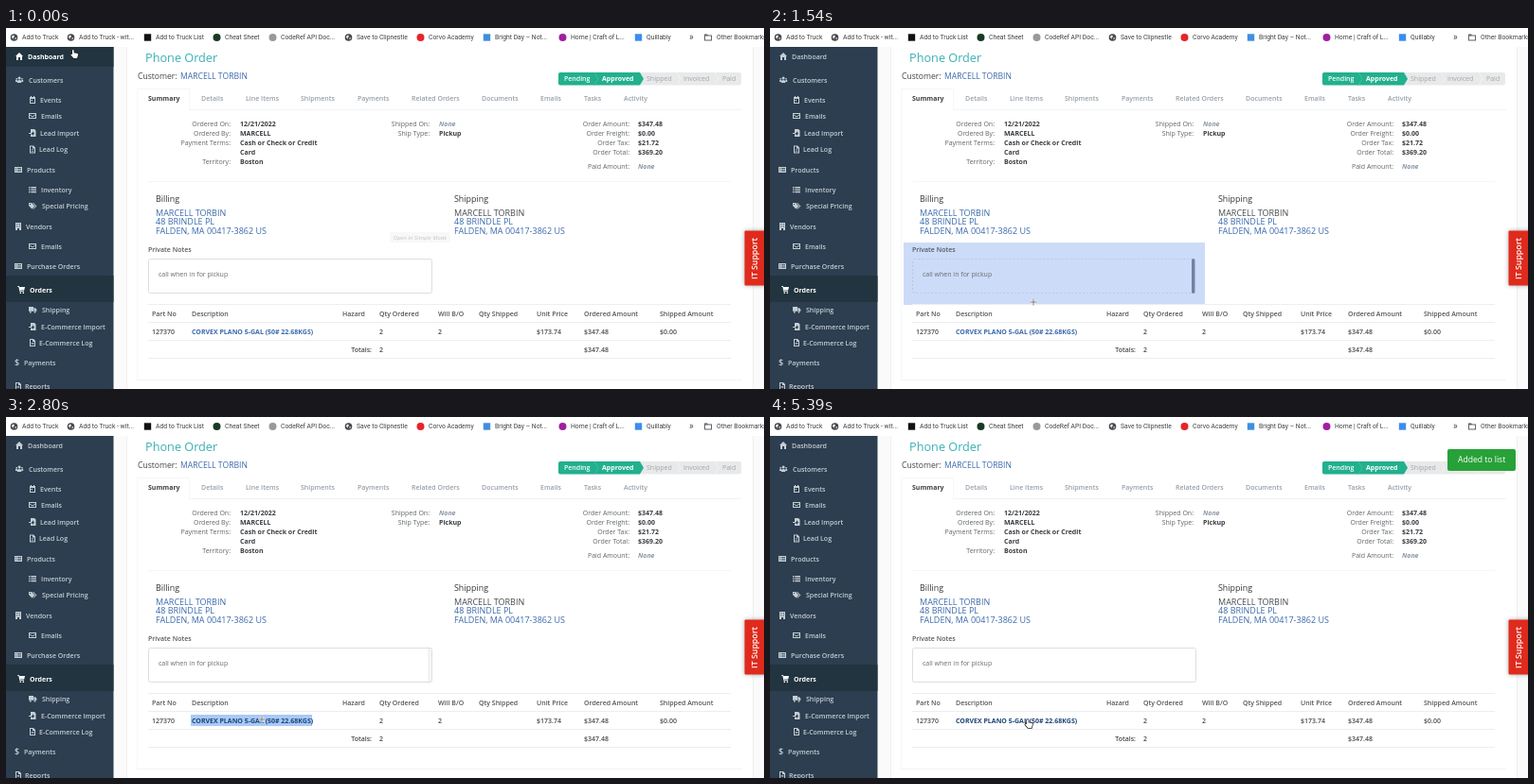
An HTML page with a canvas for the animation above (5460 ms loop, 800x382 px).

```html
<!DOCTYPE html>
<html lang="en">
<head>
<meta charset="utf-8">
<title>Phone Order</title>
<style>
html, body { margin: 0; width: 100%; height: 100%; overflow: hidden; background: #fff; }
canvas { display: block; }
</style>
</head>
<body>
<canvas id="stage" width="800" height="382"></canvas>
<script>
const c = document.getElementById('stage').getContext('2d');
const LOOP = 5460, STEP = 70;
const LINK = '#3a69ac', DARK = '#45484c', GREY = '#979fa7', RULE = '#eceeef';

// Text is placed by the vertical middle of its capitals.
function text(s, x, y, { size = 7, weight = 400, color = DARK, align = 'left', family = '"Open Sans"', style = '' } = {}) {
  c.font = `${style} ${weight} ${size}px ${family}, sans-serif`;
  c.fillStyle = color;
  c.textAlign = align;
  c.fillText(s, x, y + size * 0.36);
}
function rect(x, y, w, h, color, r = 0) {
  c.fillStyle = color;
  c.beginPath();
  c.roundRect(x, y, w, h, r);
  c.fill();
}
function frame(x, y, w, h, color, r = 0, dash = []) {
  c.strokeStyle = color;
  c.lineWidth = 1;
  c.setLineDash(dash);
  c.beginPath();
  c.roundRect(x + .5, y + .5, w - 1, h - 1, r);
  c.stroke();
  c.setLineDash([]);
}
function line(x1, y, x2, color = RULE) { rect(x1, y, x2 - x1, 1, color); }
function dot(x, y, r, color) {
  c.fillStyle = color;
  c.beginPath();
  c.arc(x, y, r, 0, 7);
  c.fill();
}
function shape(d, x, y, fill, stroke, width = 1) {
  const p = new Path2D(d);
  c.save();
  c.translate(x, y);
  if (stroke) { c.strokeStyle = stroke; c.lineWidth = width; c.stroke(p); }
  if (fill) { c.fillStyle = fill; c.fill(p, 'evenodd'); }
  c.restore();
}
const between = (t, a, b) => t >= a && t < b;

// Menu icons in an 8 by 8 box.
const icons = {
  home: 'M4 0L8 4H7V8H5V5H3V8H1V4H0Z',
  users: 'M2.6 2a1.5 1.5 0 1 0 3 0a1.5 1.5 0 1 0-3 0M1.8 7V5.5Q1.8 4 4 4Q6.3 4 6.3 5.5V7ZM0 6V4.5Q0 3.5 1.8 3.5V6ZM8.2 6V4.5Q8.2 3.5 6.4 3.5V6ZM.5 2h1.4v1.2H.5ZM6.3 2h1.4v1.2H6.3Z',
  calendar: 'M1 1H2V0H3V1H5V0H6V1H7V8H1ZM2 3V7H6V3ZM2.5 4H4V5.3H2.5Z',
  mail: 'M0 1H8V7H0ZM1 2V2.4L4 4.6L7 2.4V2ZM1 3.4V6H7V3.4L4 5.6Z',
  import: 'M2 0H6L7.5 1.5V8H2V5.5H4V7L6 4.5L4 2.3V4H2ZM0 4H3V5H0Z',
  file: 'M1 0H5L7 2V8H1ZM2 1V7H6V3H4V1ZM2.6 4H5.4V4.7H2.6ZM2.6 5.4H5.4V6.1H2.6Z',
  card: 'M0 1H8V7H0ZM1 2.3H2V3.2H1ZM3 2.3H7V3.2H3ZM1 4.6H2V5.5H1ZM3 4.6H7V5.5H3Z',
  list: 'M0 1H1.5V2.4H0ZM2.3 1H8V2.4H2.3ZM0 3.4H1.5V4.8H0ZM2.3 3.4H8V4.8H2.3ZM0 5.8H1.5V7.2H0ZM2.3 5.8H8V7.2H2.3Z',
  tags: 'M0 1H3L6.4 4.5L3.5 7.5L0 4ZM1 2V3H2V2ZM4 1H5L8.4 4.5L5 7.8L4.6 7.3L7.2 4.5Z',
  building: 'M1 0H7V8H5V6H3V8H1ZM2.2 1.2V2.2H3.3V1.2ZM4.7 1.2V2.2H5.8V1.2ZM2.2 3.4V4.4H3.3V3.4ZM4.7 3.4V4.4H5.8V3.4Z',
  cart: 'M0 0H1.8L2.2 1H8L7.2 4.5H3L3.2 5.3H7V6H2.5L1.3 .8H0ZM2.6 6.5H4V8H2.6ZM5.6 6.5H7V8H5.6Z',
  truck: 'M0 1H5V5.7H0ZM5.4 2.3H7L8.4 4V5.7H5.4ZM1 6H2.6V7.4H1ZM5.7 6H7.3V7.4H5.7Z'
};
const menu = [
  ['Dashboard', 'home', 10, 23, 30], ['Customers', 'users', 10, 24, 55],
  ['Events', 'calendar', 24, 36, 76], ['Emails', 'mail', 24, 37, 93],
  ['Lead Import', 'import', 24, 36, 111], ['Lead Log', 'file', 24, 35, 128.5],
  ['Products', 'card', 9, 22, 150], ['Inventory', 'list', 24, 37, 171],
  ['Special Pricing', 'tags', 24, 38, 188], ['Vendors', 'building', 9, 21, 210],
  ['Emails', 'mail', 24, 37, 231], ['Purchase Orders', 'card', 9, 22, 252],
  ['Orders', 'cart', 12, 25, 277], ['Shipping', 'truck', 24, 38, 298],
  ['E-Commerce Import', 'import', 24, 37, 316], ['E-Commerce Log', 'file', 24, 35, 333],
  ['Payments', '', 9, 19, 354], ['Reports', 'file', 9, 20, 379]
];

function bookmarks(t) {
  rect(0, 0, 800, 20, '#fff');
  if (between(t, 350, 1225)) rect(-4, 1, 63, 17, '#e1e2e4', 8);
  const items = [
    ['Add to Truck', 17, 'globe'], ['Add to Truck - wit...', 77, 'globe'],
    ['Add to Truck List', 158, '#111', 1], ['Cheat Sheet', 231, '#173b22'],
    ['CodeRef API Doc...', 290, '#999'], ['Save to Clipnestle', 370, 'globe'],
    ['Corvo Academy', 446, '#e5252a'], ['Bright Day – Not...', 516, '#3f8fe0', 1],
    ['Home | Craft of L...', 596, '#a020a0'], ['Quillably', 676, '#3c8cf0', 1],
    ['Other Bookmarks', 750, 'folder']
  ];
  for (const [label, x, mark, square] of items) {
    const mx = x - 8.5;
    if (mark === 'globe') {
      dot(mx, 10, 3.8, '#44484c');
      shape('M-2.6-1L-.5-2.4L.5-1L-.8.3L-1.2 2ZM1 .2L2.7.5L1.3 2.4Z', mx, 10, '#fff');
    } else if (mark === 'folder') {
      shape('M0 0H3L4 1H8V7H0ZM1 2V6H7V2Z', x - 13, 6.5, '#5f6368');
    } else if (square) rect(mx - 3.7, 6.3, 7.4, 7.4, mark);
    else dot(mx, 10, 4, mark);
    text(label, x, 10, { size: 6.8, family: 'Roboto', color: '#3c4043' });
  }
  text('»', 721, 9.6, { size: 10, family: 'Roboto' });
}

function sidebar(t) {
  rect(0, 20, 113.5, 362, '#2c3e4f');
  const active = t < 140, picked = between(t, 1085, 1225);
  if (active) rect(0, 20, 113.5, 21, '#22343f');
  if (picked) rect(0, 41, 113.5, 27, '#214f82');
  rect(0, 262, 113.5, 28, '#22343f');
  for (const [label, icon, ix, x, y] of menu) {
    const on = label === 'Orders' || (active && label === 'Dashboard') || (picked && label === 'Customers');
    const color = on ? '#fff' : '#c6ced5';
    if (icon) shape(icons[icon], ix, y - 4, color);
    else text('$', ix, y, { size: 9, weight: 600, color });
    text(label, x, y, { weight: on ? 700 : 600, color });
  }
}

function pipeline() {
  rect(583, 47, 193, 13.5, '#e8e9ea', 2);
  shape('M2 0H86L90 6.7L86 13.5H2Q0 13.5 0 11.5V2Q0 0 2 0Z', 583, 47, '#22b08e');
  for (const x of [621, 708, 748]) shape('M0 0L4 6.7L0 13.5', x, 47, null, x < 650 ? '#3fbea0' : '#f3f3f3');
  text('Pending', 589, 53.5, { weight: 600, color: '#fff' });
  text('Approved', 629, 53.5, { weight: 700, color: '#fff' });
  [['Shipped', 676], ['Invoiced', 715], ['Paid', 756]].forEach(([s, x]) => text(s, x, 53.5, { color: '#a2a5a8' }));
}

function pairs(rows, right, left) {
  for (const [label, value, y] of rows) {
    const none = value === 'None';
    text(label, right, y, { align: 'right', color: '#606468' });
    text(value, left, y, { weight: 700, style: none ? 'italic' : '', color: none ? '#8896a5' : '#3a3d41' });
  }
}

function address(title, x, nameColor) {
  text(title, x, 181, { size: 8.9, color: '#333' });
  text('MARCELL TORBIN', x, 195.5, { size: 9, color: nameColor });
  text('48 BRINDLE PL', x, 205, { size: 9, color: LINK });
  text('FALDEN, MA 00417-3862 US', x, 214.5, { size: 9, color: LINK });
}

function notes(t) {
  const picked = between(t, 1470, 1750);
  if (picked) rect(141, 227, 318, 66, '#ccdcf8');
  text('Private Notes', 150, 234, { weight: 600, color: '#54585c' });
  frame(150, 244, picked ? 298 : 300, 37, picked ? '#b9c8e2' : '#dcdee0', 2, picked ? [2, 2] : []);
  text('call when in for pickup', 161, 260, { color: '#66696d' });
  if (between(t, 1470, 2950)) {
    c.globalAlpha = Math.min(1, Math.max(.12, (2600 - t) / 500));
    rect(445, 244, 3.5, 37, picked ? '#7083a3' : '#9a9c9e', 2);
    c.globalAlpha = 1;
  }
}

function table(t) {
  if (between(t, 1750, 1995)) rect(191, 292, 161, 20, '#b9ccf5');
  if (between(t, 1995, 3150)) rect(195, 315, 128, 12, '#a9c9f7');
  [292, 311, 330, 349].forEach(y => line(150, y, 765));
  const head = ['Part No', 'Description', 'Hazard', 'Qty Ordered', 'Will B/O', 'Qty Shipped', 'Unit Price', 'Ordered Amount', 'Shipped Amount'];
  const row = ['127370', 'CORVEX PLANO 5-GAL (50# 22.68KGS)', '', '2', '2', '', '$173.74', '$347.48', '$0.00'];
  [154, 196, 355, 394, 456, 499, 560, 610, 690].forEach((x, i) => {
    text(head[i], x, 302, { weight: 600, color: '#505458' });
    text(row[i], x, 321, { weight: i === 1 ? 700 : 600, color: i === 1 ? (t < 1995 ? LINK : '#1c4476') : DARK });
  });
  text('Totals:', 386, 340, { weight: 600, align: 'right' });
  text('2', 394, 340, { weight: 600 });
  text('$347.48', 610, 340, { weight: 600 });
}

function page(t) {
  rect(113, 20, 687, 362, '#fafafa');
  rect(127, 20, 662, 362, '#eff0f0');
  rect(128, 20, 660, 362, '#fff');
  text('Phone Order', 147, 31, { size: 12.7, color: '#3bb0b6' });
  text('Customer:', 139, 51, { size: 8.6, color: '#404347' });
  text('MARCELL TORBIN', 184, 51, { size: 8.6, color: LINK });
  pipeline();

  line(139, 64, 193, '#f5f6f6');
  rect(138, 64, 1, 309, '#f6f7f7');
  rect(193, 64, 1, 23, '#f5f6f6');
  line(193, 86, 777, '#f2f3f4');
  line(138, 372, 777, '#f2f3f4');
  text('Summary', 150, 74.5, { weight: 700, color: '#3d4043' });
  [['Details', 206], ['Line Items', 253], ['Shipments', 311], ['Payments', 371], ['Related Orders', 428],
    ['Documents', 502], ['Emails', 564], ['Tasks', 610], ['Activity', 652]
  ].forEach(([s, x]) => text(s, x, 74.5, { weight: 600, color: GREY }));

  pairs([['Ordered On:', '12/21/2022', 101], ['Ordered By:', 'MARCELL', 111],
    ['Payment Terms:', 'Cash or Check or Credit', 121], ['', 'Card', 131], ['Territory:', 'Boston', 141]], 237, 247);
  pairs([['Shipped On:', 'None', 101], ['Ship Type:', 'Pickup', 111]], 447, 457);
  pairs([['Order Amount:', '$347.48', 101], ['Order Freight:', '$0.00', 111], ['Order Tax:', '$21.72', 121],
    ['Order Total:', '$369.20', 131], ['Paid Amount:', 'None', 146.5]], 658, 667);
  line(150, 162, 765, '#f4f5f5');

  address('Billing', 158, LINK);
  address('Shipping', 473, '#45484c');
  notes(t);
  table(t);
}

function overlays(t) {
  if (t < 280) {
    c.globalAlpha = 1 - t / 280;
    rect(405, 216, 64, 11, '#f8f8f8', 2);
    text('Open in Simple Mode', 437, 221.5, { size: 6, style: 'italic', color: '#c4c4c4', align: 'center' });
    c.globalAlpha = 1;
  }
  c.save();
  c.shadowColor = '#0005';
  c.shadowBlur = 5;
  rect(779.5, 214.5, 24, 58, '#df2b1d', 1);
  c.restore();
  c.save();
  c.translate(790, 244);
  c.rotate(-Math.PI / 2);
  text('IT Support', 0, 0, { size: 8.8, weight: 600, color: '#fff', align: 'center' });
  c.restore();

  if (between(t, 3220, 4830)) {
    rect(727, 34, 60, 23, '#777', 2);
    text('Loading...', 737, 45, { size: 8.6, color: '#fff' });
  } else if (t >= 4830) {
    rect(715, 34, 72, 23, '#28a138', 2);
    text('Added to list', 726, 45, { size: 8.6, color: '#fff' });
  }
}

const path = [
  [0, 70, 23], [420, 28, 9], [840, 28, 9], [1190, 143, 79], [1540, 278, 290], [1890, 268, 308],
  [2100, 269, 320], [2800, 270, 320], [3150, 267, 319], [4480, 267, 319], [5390, 271, 320], [LOOP, 271, 320]
];
function cursor(t) {
  const i = path.findIndex(p => p[0] > t);
  const [t0, x0, y0] = path[i - 1], [t1, x1, y1] = path[i];
  const k = (t - t0) / (t1 - t0);
  const x = x0 + (x1 - x0) * k, y = y0 + (y1 - y0) * k;
  if (between(t, 700, 3150)) {
    const cross = 'M-3.5 0H3.5M0-3.5V3.5';
    shape(cross, x, y, null, '#fff', 2.4);
    shape(cross, x, y, null, '#777', 1);
  } else if (y < 20) {
    shape('M0 0V9L2 7.2L3.4 10L4.8 9.4L3.5 6.6H6.3Z', x, y, '#111', '#fff');
  } else {
    shape('M0 .5Q.8-.6 1.6.5V3.2L5.5 4Q6.3 4.4 6 5.6L5 9H1.4L-1.6 5.6Q-1.6 4.6-.6 4.8L0 5.2Z', x, y, '#fff', '#222', 1.5);
  }
}

const start = performance.now();
function draw() {
  const t = Math.floor((performance.now() - start) % LOOP / STEP) * STEP;
  page(t);
  sidebar(t);
  bookmarks(t);
  overlays(t);
  cursor(t);
  requestAnimationFrame(draw);
}
draw();
</script>
</body>
</html>
```
